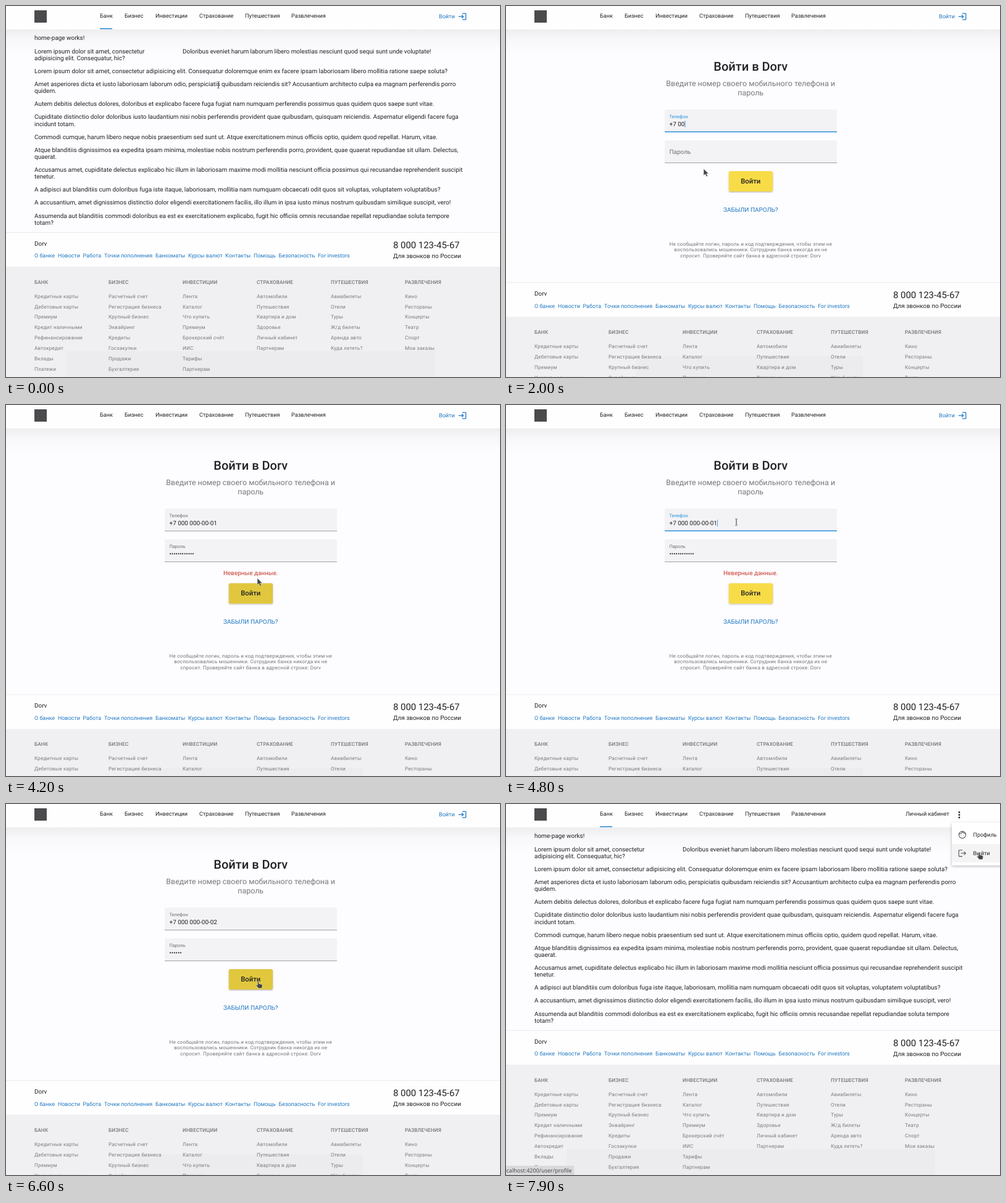
Animation of 800x602 px, one loop 8 s. Source, as an HTML page:

```html
<!DOCTYPE html>
<html lang="ru">
<head>
<meta charset="utf-8">
<title>Вход в банк</title>
<style>
  html, body { margin: 0; width: 100%; height: 100%; overflow: hidden; background: #fdfcfe; }
  svg { display: block; width: 100vw; height: 100vh; }
  text { font-family: Roboto, sans-serif; fill: #212123; white-space: pre; text-rendering: geometricPrecision; }
  .medium { font-weight: 500; }
  .mid { text-anchor: middle; }
  .link { fill: #1f78c4; }
  .soft { fill: #78787a; }
  .list { fill: #7b7b7d; letter-spacing: .18px; }
  .head { fill: #757577; font-weight: 500; letter-spacing: .12px; }
  .note { fill: #747476; letter-spacing: .2px; }
  .error { fill: #c73a2e; }
  .status { font-family: "Noto Sans", sans-serif; fill: #48484c; text-anchor: end; }
  .hidden { display: none; }
</style>
</head>
<body>
<svg id="stage" viewBox="0 0 800 602" xmlns="http://www.w3.org/2000/svg"></svg>
<script>
const BRAND = 'Dorv';
const BLUE = '#2493dc';
const BODY = 9.94;
const LOOP = 8000;

const NAV = [[152, 'Банк'], [192, 'Бизнес'], [242, 'Инвестиции'], [313, 'Страхование'],
  [387, 'Путешествия'], [462, 'Развлечения']];

const LINKS = [[46, 'О банке'], [84, 'Новости'], [124.5, 'Работа'], [159, 'Точки пополнения'],
  [242, 'Банкоматы'], [295, 'Курсы валют'], [355, 'Контакты'], [401, 'Помощь'],
  [441.5, 'Безопасность'], [505, 'For investors']];

const COLUMNS = [
  'БАНК|Кредитные карты|Дебетовые карты|Премиум|Кредит наличными|Рефинансирование|Автокредит|Вклады|Платежи',
  'БИЗНЕС|Расчетный счет|Регистрация бизнеса|Крупный бизнес|Эквайринг|Кредиты|Госзакупки|Продажи|Бухгалтерия',
  'ИНВЕСТИЦИИ|Лента|Каталог|Что купить|Премиум|Брокерский счёт|ИИС|Тарифы|Партнерам',
  'СТРАХОВАНИЕ|Автомобили|Путешествия|Квартира и дом|Здоровье|Личный кабинет|Партнерам',
  'ПУТЕШЕСТВИЯ|Авиабилеты|Отели|Туры|Ж/д билеты|Аренда авто|Куда лететь?',
  'РАЗВЛЕЧЕНИЯ|Кино|Рестораны|Концерты|Театр|Спорт|Мои заказы'
].map(column => column.split('|'));

const PARAGRAPHS = [
  'home-page works!',
  'Lorem ipsum dolor sit amet, consectetur|adipisicing elit. Consequatur, hic?',
  'Lorem ipsum dolor sit amet, consectetur adipisicing elit. Consequatur doloremque enim ex facere ipsam laboriosam libero mollitia ratione saepe soluta?',
  'Amet asperiores dicta et iusto laboriosam laborum odio, perspiciatis quibusdam reiciendis sit? Accusantium architecto culpa ea magnam perferendis porro|quidem.',
  'Autem debitis delectus dolores, doloribus et explicabo facere fuga fugiat nam numquam perferendis possimus quas quidem quos saepe sunt vitae.',
  'Cupiditate distinctio dolor doloribus iusto laudantium nisi nobis perferendis provident quae quibusdam, quisquam reiciendis. Aspernatur eligendi facere fuga|incidunt totam.',
  'Commodi cumque, harum libero neque nobis praesentium sed sunt ut. Atque exercitationem minus officiis optio, quidem quod repellat. Harum, vitae.',
  'Atque blanditiis dignissimos ea expedita ipsam minima, molestiae nobis nostrum perferendis porro, provident, quae quaerat repudiandae sit ullam. Delectus,|quaerat.',
  'Accusamus amet, cupiditate delectus explicabo hic illum in laboriosam maxime modi mollitia nesciunt officia possimus qui recusandae reprehenderit suscipit|tenetur.',
  'A adipisci aut blanditiis cum doloribus fuga iste itaque, laboriosam, mollitia nam numquam obcaecati odit quos sit voluptas, voluptatem voluptatibus?',
  'A accusantium, amet dignissimos distinctio dolor eligendi exercitationem facilis, illo illum in ipsa iusto minus nostrum quibusdam similique suscipit, vero!',
  'Assumenda aut blanditiis commodi doloribus ea est ex exercitationem explicabo, fugit hic officiis omnis recusandae repellat repudiandae soluta tempore|totam?'
];

// Text is placed by the vertical centre of its capitals.
const text = (x, y, size, string, cls = '', extra = '') =>
  `<text x="${x}" y="${y + size * .35}" font-size="${size}" class="${cls}" ${extra}>${string}</text>`;
const rect = (x, y, w, h, fill, extra = '') =>
  `<rect x="${x}" y="${y}" width="${w}" height="${h}" fill="${fill}" ${extra}/>`;
const group = (id, content) => `<g id="${id}">${content}</g>`;
const icon = (x, y, fill, path) =>
  `<path transform="translate(${x} ${y}) scale(.63)" fill="${fill}" d="${path}"/>`;

function homePage() {
  let y = 52;
  const lines = PARAGRAPHS.map(paragraph => {
    const rows = paragraph.split('|');
    const html = rows.map((row, i) => text(46, y + i * 11.2, BODY, row)).join('');
    y += 21.1 + (rows.length - 1) * 11.2;
    return html;
  });
  return lines.join('') +
    text(286, 73.1, BODY, 'Doloribus eveniet harum laborum libero molestias nesciunt quod sequi sunt unde voluptate!');
}

const field = (id, y, label) => group(id,
  `<path d="M257 ${y + 37}v-34.5q0-2.5 2.5-2.5h274q2.5 0 2.5 2.5v34.5z" fill="#f3f2f4"/>` +
  rect(257, y + 36.2, 279, .8, '#8e8e90', 'class="line"') +
  text(264.5, y + 18.5, BODY, label, 'label') +
  text(264.5, y + 23.2, BODY, '', 'value') +
  rect(0, y + 18, .8, 11, BLUE, 'class="caret"'));

const loginPage = () =>
  text(396.2, 98.3, 20, `Войти в ${BRAND}`, 'mid medium') +
  text(396.2, 126, 12.43, 'Введите номер своего мобильного телефона и', 'mid soft') +
  text(396.2, 140.5, 12.43, 'пароль', 'mid soft') +
  field('phone', 168, 'Телефон') +
  field('password', 218, 'Пароль') +
  text(396.2, 273, BODY, 'Неверные данные.', 'mid error', 'id="error"') +
  group('below',
    rect(360.8, 268, 71.2, 33, '#f8dc47', 'id="button" rx="2.5" filter="url(#raised)"') +
    text(396.2, 284.2, 11.2, 'Войти', 'mid medium') +
    text(396.2, 330.3, BODY, 'ЗАБЫЛИ ПАРОЛЬ?', 'mid link') +
    ['Не сообщайте логин, пароль и код подтверждения, чтобы этим не',
      'воспользовались мошенники. Сотрудник банка никогда их не',
      `спросит. Проверяйте сайт банка в адресной строке: ${BRAND}`]
      .map((row, i) => text(396.2, 385.8 + i * 9.45, 8.08, row, 'mid note')).join(''));

const footer = () =>
  rect(0, 367, 800, 56, '#fefefe') + rect(0, 367, 800, .8, '#e6e6e8') +
  text(46, 385.2, BODY, BRAND) +
  LINKS.map(([x, s]) => text(x, 405.2, 8.98, s, 'link')).join('') +
  text(627, 387.3, 14.9, '8 000 123-45-67') +
  text(627, 405.2, BODY, 'Для звонков по России') +
  rect(0, 423, 800, 400, '#f0eff1') +
  rect(0, 0, 0, 0, '#ecebed', 'id="mark"') +
  COLUMNS.map(([head, ...items], c) => {
    const x = 46 + c * 120;
    return text(x, 448, 8.2, head, 'head') +
      items.map((s, i) => text(x, 470.8 + i * 16.84, 8.2, s, 'list')).join('');
  }).join('');

const header = () =>
  rect(0, 38, 800, 42, 'url(#shade)') + rect(0, 0, 800, 38, '#fefefe') +
  rect(46, 7, 20, 20, '#4b4b4d') +
  NAV.map(([x, s]) => text(x, 16.2, 9.1, s)).join('') +
  rect(152, 36, 20, 1.5, '#2a86d0', 'id="tab"') +
  group('guest', text(701, 16.7, 9.1, 'Войти', 'link') +
    icon(731.5, 9.6, '#1f78c4', 'M11 7L9.6 8.4l2.6 2.6H2v2h10.2l-2.6 2.6L11 17l5-5zM20 19h-8v2h8q2 0 2-2V5q0-2-2-2h-8v2h8z')) +
  group('user', text(647, 16.2, 9.1, 'Личный кабинет') +
    [13.4, 17.7, 22].map(y => `<circle cx="734" cy="${y}" r="1.4" fill="#222"/>`).join(''));

const menu = () => group('menu',
  rect(722, 30, 90, 69.5, '#fff', 'rx="2.5" filter="url(#floating)"') +
  rect(722, 34.6, 78, 30, '#f4f4f5', 'id="row"') +
  '<g fill="none" stroke="#666" stroke-width="1.2"><circle cx="739" cy="50" r="5.6"/>' +
  '<path d="M733.6 48.8q4 .2 5.8-4 1.6 3.2 5 3.3M737 51.3v.8M741 51.3v.8"/></g>' +
  icon(731.5, 72.4, '#666', 'M17 7l-1.4 1.4 2.6 2.6H8v2h10.200l-2.600 2.600L17 17l5-5zM4 5h8V3H4q-2 0-2 2v14q0 2 2 2h8v-2H4z') +
  text(756.5, 50, 8.95, 'Профиль') + text(756.5, 80, 8.95, 'Выйти'));

const pointers = () => group('pointer',
  '<path id="arrow" fill="#444446" stroke="#f5f5f5" stroke-width=".5" d="M0 0v11l2.6-2.3 1.9 4 2-.9-1.9-3.9h3.4z"/>' +
  '<path id="beam" fill="none" stroke="#666668" stroke-width=".9" d="M-2-5.5q2 0 2 1v9q0 1-2 1M2-5.5q-2 0-2 1v9q0 1 2 1"/>' +
  '<path id="hand" fill="#444446" stroke="#f5f5f5" stroke-width=".5" d="M-1 1a1 1 0 0 1 2 0v3.5l4.5 1.2q1.5.5 1.2 2l-.8 4.3h-5.5l-3.6-4.5q-.4-1.3 1-1.2l1.2.9z"/>');

const shadow = (id, dy, blur, alpha) =>
  `<filter id="${id}" x="-30%" y="-30%" width="160%" height="170%"><feDropShadow dx="0" dy="${dy}" stdDeviation="${blur}" flood-opacity="${alpha}"/></filter>`;

document.getElementById('stage').innerHTML =
  `<defs><linearGradient id="shade" x1="0" y1="0" x2="0" y2="1">
    <stop stop-opacity=".06"/><stop offset=".4" stop-opacity=".022"/><stop offset="1" stop-opacity="0"/>
  </linearGradient>${shadow('raised', 1, .9, .32)}${shadow('floating', 1.5, 2, .28)}</defs>` +
  group('home', homePage()) + group('login', loginPage()) + group('footer', footer()) +
  group('header', header()) + menu() +
  group('status', rect(-4, 587, 0, 19, '#d9d9dc', 'id="plate" rx="2"') + text(0, 594.7, 9, '', 'status', 'id="address"')) +
  pointers();

const $ = id => document.getElementById(id);
const show = (node, on) => node.classList.toggle('hidden', !on);
const set = (node, attrs) => Object.entries(attrs).forEach(([k, v]) => node.setAttribute(k, v));
const shift = (id, y) => set($(id), { transform: `translate(0 ${y})` });
const clamp = v => Math.min(1, Math.max(0, v));
const smooth = v => v * v * (3 - 2 * v);

// Value of the latest entry that has begun.
const latest = (table, t) => table.reduce((value, [start, next]) => t >= start ? next : value, table[0][1]);

const PATH = [[0, 344, 128], [100, 344, 128], [700, 713, 17], [850, 712, 18], [1000, 701, 35.5],
  [1400, 380, 188], [1550, 372, 190], [1800, 203, 476], [2100, 361, 190], [2900, 361, 190],
  [3400, 370, 258.5], [3550, 364, 240], [3700, 364, 240], [3950, 405, 282], [4200, 407, 281],
  [4700, 373, 190], [6000, 373, 190], [6400, 408.5, 287], [6700, 408.5, 287],
  [7300, 734, 17], [7400, 734, 18], [7650, 755, 50], [7900, 766, 78]];

const SHAPE = [[0, 'beam'], [400, 'arrow'], [700, 'hand'], [900, 'arrow'], [1300, 'beam'], [1600, 'arrow'],
  [2100, 'beam'], [3100, 'arrow'], [3200, 'beam'], [3400, 'arrow'], [3500, 'beam'], [3800, 'arrow'],
  [3900, 'hand'], [4100, 'arrow'], [4600, 'beam'], [6200, 'arrow'], [6300, 'hand'], [6800, 'arrow'], [7200, 'hand']];

const FOCUS = [[0, ''], [1500, 'phone'], [3600, 'password'], [4000, 'button'], [4700, 'phone'],
  [5300, 'password'], [6500, 'button']];

const PHONE = '+7 000 000-00-0';
const TYPED = [[0, 0], [1900, 4], [2000, 5], [2100, 6], [2300, 8], [2500, 12], [2600, 16], [5000, 15], [5100, 16]];
const DOTS = [[0, 0], [3700, 4], [3800, 8], [3900, 12], [5600, 1], [5700, 2], [5800, 3], [5900, 4], [6000, 5], [6100, 6]];
const ADDRESS = [[0, ''], [700, 'auth/login'], [1200, ''], [7600, 'user/profile']];

function pointerAt(t) {
  const i = PATH.findIndex(([end]) => end >= t);
  if (i < 1) return PATH[0].slice(1);
  const [t0, x0, y0] = PATH[i - 1], [t1, x1, y1] = PATH[i];
  const k = smooth((t - t0) / (t1 - t0));
  return [x0 + (x1 - x0) * k, y0 + (y1 - y0) * k];
}

function drawField(id, top, { value, focused, hovered, lift, caret }) {
  const part = name => $(id).querySelector('.' + name);
  const size = BODY * (1 - lift / 4);
  const thick = focused || hovered ? 1.5 : .8;
  set(part('line'), { y: top + 37 - thick, height: thick, fill: focused ? BLUE : hovered ? '#222' : '#8e8e90' });
  set(part('label'), { y: top + 18.5 - 7.2 * lift + size * .35, 'font-size': size });
  part('label').style.fill = focused ? BLUE : '#6d6d6f';
  part('value').textContent = value;
  show(part('caret'), caret);
  if (caret) set(part('caret'), { x: 264.8 + part('value').getComputedTextLength() });
}

function render(t) {
  const login = t >= 800 && t < 6800;
  const signedIn = t >= 6800;
  const failed = t >= 4100 && t < 5000;
  const focus = latest(FOCUS, t);
  const shape = latest(SHAPE, t);
  const [x, y] = pointerAt(t);
  const drop = failed ? 21.2 : 0;
  const over = top => x > 257 && x < 536 && y > top && y < top + 37;

  show($('home'), !login);
  show($('login'), login);
  show($('tab'), !login);
  show($('guest'), !signedIn);
  show($('user'), signedIn);
  shift('footer', login ? 81.4 + drop : 0);
  set($('mark'), login ? { x: 210, y: 487, width: 368, height: 368 } : { x: 98, y: 560, width: 597, height: 597 });

  if (login) {
    const count = latest(TYPED, t);
    const dots = latest(DOTS, t);
    drawField('phone', 168, {
      value: (PHONE + (t < 5000 ? 1 : 2)).slice(0, count), focused: focus === 'phone', hovered: over(168),
      lift: smooth(clamp((t - 1400) / 300)), caret: focus === 'phone' && (t < 2600 || t >= 4700)
    });
    drawField('password', 218, {
      value: '•'.repeat(dots), focused: focus === 'password', hovered: over(218),
      lift: smooth(clamp((t - 3500) / 300)), caret: focus === 'password'
    });
    show($('error'), failed);
    shift('below', drop);
    set($('button'), { fill: focus === 'button' || shape === 'hand' && y > 260 ? '#e1c73c' : '#f8dc47' });
  }

  show($('menu'), t >= 7400);
  show($('row'), t >= 7600);
  set($('row'), { y: y > 64.6 ? 64.6 : 34.6 });

  const address = latest(ADDRESS, t);
  const edge = address === 'auth/login' ? 104.5 : 110.5;
  show($('status'), address);
  set($('plate'), { width: edge + 4 });
  set($('address'), { x: edge - 4 });
  $('address').textContent = 'localhost:4200/' + address;

  for (const id of ['arrow', 'beam', 'hand']) show($(id), id === shape);
  set($('pointer'), { transform: `translate(${x} ${y})` });
}

// The picture advances ten times a second.
const start = performance.now();
function tick() {
  const elapsed = Math.max(0, performance.now() - start) % LOOP;
  render(Math.floor(elapsed / 100) * 100);
  requestAnimationFrame(tick);
}
tick();
</script>
</body>
</html>
```
